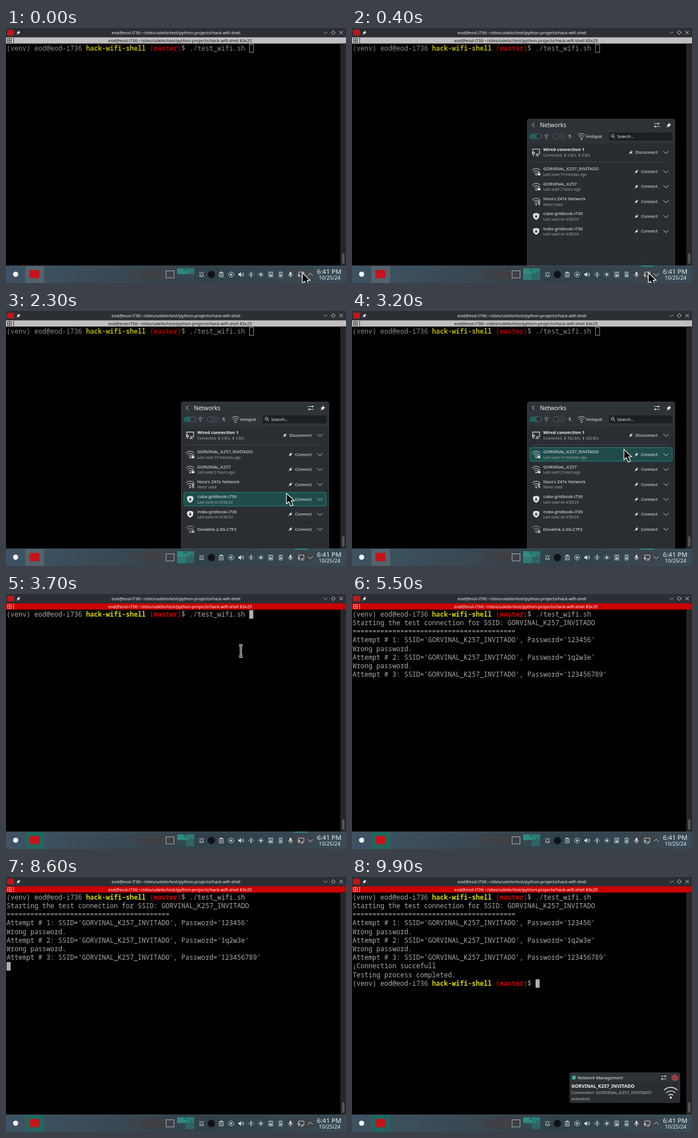
An HTML page for the animation above (10 s loop, 600 by 450 pixels).

```html
<!DOCTYPE html>
<html lang="en">
<head>
<meta charset="utf-8">
<title>Wi-Fi test</title>
<style>
html, body { margin: 0; width: 100%; height: 100%; overflow: hidden; background: #000; }
svg { display: block; width: 600px; height: 450px; }
text { font-family: "Noto Sans", sans-serif; font-size: 7.6px; fill: #f0f1f2; white-space: pre; }
.mono text { font-family: "Noto Sans Mono", monospace; font-size: 11.7px; fill: #aaa; }
.mono .dir { font-weight: bold; fill: #d8d400; }
.mono .git { font-weight: bold; fill: #cc0000; }
.sub { font-size: 6.4px; fill: #a5a9ac; }
.line { fill: none; stroke: #e6e8e9; stroke-width: .9; }
</style>
</head>
<body>
<svg id="stage" viewBox="0 0 600 450" xmlns="http://www.w3.org/2000/svg"></svg>
<script>
const LOOP = 10000;
const HOST = 'eod@eod-i736';
const PATH = HOST + ':~/sites/udelio/test/python-projects/hack-wifi-shell';
const WIFI = 'GORVINAL_K257';
const GUEST = WIFI + '_INVITADO';
const ROW = 15.2, COL = 7.02;

const rect = (x, y, w, h, fill, more = '') =>
  `<rect x="${x}" y="${y}" width="${w}" height="${h}" fill="${fill}" ${more}/>`;
const disc = (x, y, r, fill, more = '') =>
  `<circle cx="${x}" cy="${y}" r="${r}" fill="${fill}" ${more}/>`;
const line = (d, more = '') => `<path class="line" d="${d}" ${more}/>`;
const text = (x, y, s, more = '') => `<text x="${x}" y="${y}" ${more}>${s}</text>`;
const group = (id, body, more = '') => `<g id="${id}" ${more}>${body}</g>`;
const at = (x, y, body, k = 1) => `<g transform="translate(${x} ${y}) scale(${k})">${body}</g>`;

// Small icons, each drawn around 0,0
const icon = {
  wifi: line('M-7.4-2.4a10.5 10.5 0 0 1 14.8 0M-5 .6a7 7 0 0 1 10 0M-2.6 3.3a3.6 3.6 0 0 1 5.2 0') + disc(0, 5.8, 1.2, '#e6e8e9'),
  lock: rect(2.6, 3.2, 4.8, 3.6, '#e6e8e9') + line('M3.7 3.2v-1.2a1.3 1.3 0 0 1 2.6 0v1.2'),
  blue: line('M3 0l4 5l-2 2v-9l2 2l-4 5'),
  shield: '<path d="M0-6l5.4 1.8v3.6c0 3.6-2.7 5.6-5.4 7c-2.7-1.4-5.4-3.4-5.4-7v-3.6z" fill="#e6e8e9"/>' +
    rect(-1.9, -.6, 3.8, 3, '#3a3f44') + '<path d="M-1.2-.6v-1a1.2 1.2 0 0 1 2.4 0v1" fill="none" stroke="#3a3f44" stroke-width=".8"/>',
  wired: line('M-3.5 2.5h-1.5v-7h10v7h-5M1.5 2.5v2.5M-1 5h5M-5.5 0h3v2.5h-3zM-4 2.5v3'),
  plug: line('M-4.5 4.5l3-3M2 0l2.5-2.5M0-2l2.5-2.5') + '<path d="M-3 1l3.2-3.8l3 3l-3.8 3.2z" fill="#e6e8e9"/>',
  down: line('M-4.5-2l4.5 4.5l4.5-4.5'),
  up: line('M-4.5 2l4.5-4.5l4.5 4.5'),
  sliders: line('M-5-2.5h10M-5 2.5h10') + rect(2, -4, 1.5, 3, '#e6e8e9') + rect(-3.5, 1, 1.5, 3, '#e6e8e9'),
  pin: '<path d="M0-4l4 4l-1.4.4l-1.6 1.8l-.4 1.8l-1.6-1.6l-3.4 2.6l2.4-3.6l-1.6-1.6l1.8-.4l1.8-1.8z" fill="#f0f1f2"/>',
  bell: line('M-4 3h8l-1.5-2v-2a2.5 2.5 0 0 0-5 0v2zM-1 4.5h2M-4.5-3.5l1.5-1M4.5-3.5l-1.5-1'),
  clip: line('M-3.5-3.5h7v8h-7zM-2-.5h4M-2 2h4') + rect(-2, -5, 4, 2, '#e6e8e9'),
  play: line('M-4.6 0a4.6 4.6 0 1 0 9.2 0a4.6 4.6 0 1 0-9.2 0') + '<path d="M-1.5-2.5l4 2.5l-4 2.5z" fill="#e6e8e9"/>',
  sound: '<path d="M-5-1.5h2l3-3v9l-3-3h-2z" fill="#e6e8e9"/>' + line('M1.5-2a3 3 0 0 1 0 4M3-4a5.5 5.5 0 0 1 0 8'),
  tooth: line('M-2.5-2.5l5 5l-2.5 2.5v-10l2.5 2.5l-5 5') + disc(-4.5, 0, .8, '#e6e8e9') + disc(4.5, 0, .8, '#e6e8e9'),
  sun: disc(0, 0, 2, '#e6e8e9') + line('M0-5v2M0 3v2M-5 0h2M3 0h2M-3.5-3.5l1.2 1.2M2.3 2.3l1.2 1.2M-3.5 3.5l1.2-1.2M2.3-2.3l1.2-1.2'),
  disk: line('M-3.5-4.5h7v9h-7zM-1.8-2.5h3.6') + rect(-1.8, 0, 3.6, 3, '#e6e8e9'),
  drive: line('M-2.8-4.5h5.6v9h-5.6zM-1.2-2.8h2.4') + disc(0, 1.3, 1.5, '#e6e8e9'),
  mic: rect(-1.7, -5, 3.4, 6.5, '#e6e8e9', 'rx="1.7"') + line('M-3.5-1v1a3.5 3.5 0 0 0 7 0v-1M0 3.5v2')
};

const prompt = cmd =>
  `(venv) ${HOST} <tspan class="dir">hack-wifi-shell</tspan> <tspan class="git">(master)</tspan>$ ${cmd}`;
const attempt = (n, pass) => `Attempt # ${n}: SSID='${GUEST}', Password='${pass}'`;

// [time shown, text]
const output = [
  [0, prompt('./test_wifi.sh')],
  [4800, 'Starting the test connection for SSID: ' + GUEST],
  [4800, '='.repeat(41)],
  [4800, attempt(1, '123456')],
  [5000, 'Wrong password.'],
  [5000, attempt(2, '1q2w3e')],
  [5300, 'Wrong password.'],
  [5300, attempt(3, '123456789')],
  [8700, '¡Connection succefull'],
  [8700, 'Testing process completed.'],
  [8700, prompt('')]
];

// [name, second line, icon]
const networks = [
  [GUEST, 'Last used 19 minutes ago', icon.wifi + icon.lock],
  [WIFI, 'Last used 2 hours ago', icon.wifi + icon.lock],
  ["Nora's Z47e Network", 'Never used', icon.wifi + icon.blue],
  ['cuba-gridbook-i736', 'Last used on 6/30/24', icon.shield],
  ['india-gridbook-i736', 'Last used on 6/30/24', icon.shield],
  ['Dovalink-2.4G-C7F2', '', icon.wifi + icon.lock]
];
const rowY = i => 253 + 26.35 * i;

// [time, x, y] of the mouse pointer
const track = [
  [0, 523, 432], [1700, 523, 432], [1900, 505, 375], [2300, 495, 322],
  [2700, 480, 244.5], [3200, 480, 244.5], [3600, 414, 100.5]
];

function windowFrame() {
  return rect(0, 0, 600, 17, '#2b2f34') +
    rect(2, 3, 12, 10, '#c4141a', 'rx="1"') + at(22, 8, icon.pin, .85) +
    text(300, 11, PATH, 'text-anchor="middle" style="font-size:7.5px"') +
    at(564, 8, icon.down, .75) + line('M577.5 4.5l3.5 3.5l-3.5 3.5l-3.5-3.5zM588.5 5l6 6M594.5 5l-6 6') +
    rect(0, 16.5, 600, 11, '#c1bfc0', 'id="bar"') +
    group('grip', '<path d="M2.5 18.5h7v7h-7zM2.5 22h7M6 18.5v7M13.5 17v10" fill="none" stroke="currentColor" stroke-width=".9"/>') +
    text(307, 24.7, PATH + ' 83x25', 'id="caption" text-anchor="middle"') +
    rect(590, 27.5, 10, 392, '#262626') + rect(593, 397.5, 4.5, 18.5, '#555', 'rx="2"');
}

function terminal() {
  const rows = output.map(([, s], i) => text(1, 39.8 + ROW * i, s, `id="out${i}"`)).join('');
  return group('term', rows, 'class="mono"') + rect(1, 28.5, 7.2, 15, '#b0b0b0', 'id="caret"');
}

function networkRow([name, sub, pic], i) {
  const y = rowY(i);
  return group('net' + i,
    rect(314, y - 12, 251, 24, '#1f4c4b', `id="hot${i}" rx="2.5" stroke="#23877c"`) +
    `<g ${sub ? '' : 'opacity=".7"'}>${at(325, y, pic)}</g>` +
    text(337.5, sub ? y - 1.8 : y + 2.8, name) + text(337.5, y + 7.6, sub, 'class="sub"') +
    at(502, y, icon.plug, .8) + text(510, y + 2.8, 'Connect') + at(554, y, icon.down));
}

const toggle = (x, on) =>
  rect(x, 187, 21, 8, on ? '#1f625d' : '#34393e', `rx="4" stroke="${on ? '#237a71' : '#4d5257'}" stroke-width=".8"`) +
  disc(on ? x + 15.5 : x + 5, 191, 4.8, '#2c3136', 'stroke="#5f6469" stroke-width=".9"');

function panel() {
  return rect(309.5, 160.5, 260, 262, '#2a2e32', 'rx="2.5" stroke="#3a3f44"') +
    rect(310, 161, 259, 43, '#2e3338') +
    line('M322 167l-4 4l4 4') + text(331.5, 175, 'Networks', 'style="font-size:10.4px"') +
    at(538, 171, icon.sliders) + at(559, 171, icon.pin) +
    toggle(314, true) + at(343, 191, icon.wifi, .6) + toggle(355, false) +
    `<g opacity=".6">${at(384, 191, line('M-4-3l8 7M-3 3h6') + rect(-1, -4, 3, 5, '#e6e8e9'), .8)}</g>` +
    at(405, 191, icon.wifi, .9) + text(413, 193.8, 'Hotspot') +
    rect(452.5, 183.5, 114, 15.5, '#1d2023', 'rx="2" stroke="#34393d"') +
    line('M457.5 190a2.4 2.4 0 1 0 4.8 0a2.4 2.4 0 1 0-4.8 0M461.6 191.8l2.4 2.4') + text(468, 193.8, 'Search...') +
    at(325, 219, icon.wired, 1.2) + text(337.5, 217.2, 'Wired connection 1', 'font-weight="bold"') +
    text(337.5, 226.6, '', 'id="rate" class="sub"') +
    at(492, 219, icon.plug + line('M0 1.5l3.5 3.5M3.5 1.5l-3.5 3.5', 'style="stroke:#da4453"'), .8) +
    text(500, 221.8, 'Disconnect') + at(554, 219, icon.down) +
    line('M318 236h240', 'style="stroke:#43484c"') +
    networks.map(networkRow).join('');
}

function taskbar() {
  const tray = ['bell', '', 'clip', 'play', 'sound', 'tooth', 'sun', 'disk', 'drive', 'mic'];
  return rect(0, 419.5, 600, 30.5, 'url(#sky)') + rect(200, 419.5, 130, 30.5, 'url(#glow)') +
    rect(492, 419.5, 60, 30.5, 'url(#glow)') + rect(0, 419.5, 600, .8, '#4a5a64') +
    disc(17, 434.5, 4.5, '#fcfcfc') +
    rect(34, 420, 33.5, 30, '#55636c', 'id="task"') +
    rect(41.5, 427, 17.5, 14.5, '#c4141a', 'rx="1.5"') +
    rect(282.5, 428.5, 14, 12.5, 'none', 'stroke="#b5bfc4" stroke-width=".9"') +
    rect(302, 424, 15, 10.5, '#2f8a82') + rect(317, 424, 15, 10.5, '#2b7d77') +
    rect(302, 434.5, 15, 10.5, '#33474f', 'id="deskA"') + rect(317, 434.5, 15, 10.5, '#2f6465', 'id="deskB"') +
    rect(313, 424.5, 5, 4, '#236c68') + rect(325, 430, 5, 3.5, '#236c68') +
    tray.map((k, i) => k ? at(345 + 17.45 * i, 435, icon[k], .95) : disc(362.5, 435, 6.5, '#111116')).join('') +
    at(521, 435, icon.wired, .95) +
    rect(509.5, 419.5, 22.5, 1.6, '#1fa08f', 'id="mark"') +
    group('spin', '<path d="M0-5.8a5.8 5.8 0 0 1 5.8 5.8" fill="none" stroke="#27b09d" stroke-width="1.3"/>') +
    group('arrowUp', at(537, 435, icon.up)) + group('arrowDown', at(537, 435, icon.down)) +
    text(570.3, 434.3, '6:41 PM', 'text-anchor="middle" style="font-size:11.5px"') +
    text(571, 444.3, '10/25/24', 'text-anchor="middle" style="font-size:9.1px"');
}

function notice() {
  return rect(384.5, 345.5, 194, 52.5, '#2a2e32', 'rx="2.5" stroke="#3a3f44"') + rect(385, 346, 193, 15.5, '#2e3338') +
    disc(391.5, 354, 3.8, '#3fa796') + text(398, 356.8, 'Network Management') +
    at(550, 354, icon.sliders, .95) +
    disc(570, 354, 4.6, '#c23a43') + line('M568 352l4 4M572 352l-4 4', 'style="stroke:#2a2e32"') +
    '<path id="ring" fill="none" stroke="#8a5055" stroke-width="1.1"/>' +
    text(387, 372, GUEST, 'font-weight="bold" style="font-size:8.3px"') +
    text(387, 382.8, `Connection '${GUEST}'`, 'style="font-size:7.5px;fill:#b9bcbe"') +
    text(387, 393.6, 'activated.', 'style="font-size:7.5px;fill:#b9bcbe"') +
    at(562.5, 380, icon.wifi, 1.6);
}

const arrow = '<path d="M0 0v18.5l4.2-3.8l3.5 7.8l4-1.8l-3.5-7.6h5.6z" fill="#000" stroke="#fff" stroke-width="1.2"/>';
const beamPath = 'M-3-10h2l1 1l1-1h2M0-9v18M-3 10h2l1-1l1 1h2';
const beam = `<path d="${beamPath}" fill="none" stroke="#fff" stroke-width="3.4"/>` +
  `<path d="${beamPath}" fill="none" stroke="#000" stroke-width="1.2"/>`;

const stage = document.getElementById('stage');
stage.innerHTML = `<defs>
  <linearGradient id="sky"><stop offset="0" stop-color="#3d5363"/><stop offset=".35" stop-color="#384853"/>
    <stop offset=".6" stop-color="#31414a"/><stop offset="1" stop-color="#394b56"/></linearGradient>
  <radialGradient id="glow"><stop offset="0" stop-color="#483c3c" stop-opacity=".75"/>
    <stop offset="1" stop-color="#483c3c" stop-opacity="0"/></radialGradient></defs>` +
  rect(0, 0, 600, 450, '#000') + terminal() + windowFrame() +
  group('panel', panel()) + group('notice', notice()) + taskbar() +
  group('arrow', arrow) + group('beam', beam);

const el = {};
stage.querySelectorAll('[id]').forEach(e => el[e.id] = e);
const show = (id, on) => el[id].style.display = on ? '' : 'none';
const set = (id, attrs) => { for (const k in attrs) el[id].setAttribute(k, attrs[k]); };
const clamp = v => Math.max(0, Math.min(1, v));
const ease = v => 1 - (1 - clamp(v)) ** 3;

function pointer(t) {
  const i = track.findIndex(k => k[0] > t);
  if (i < 0) return track[track.length - 1].slice(1);
  const [a, b] = [track[i - 1], track[i]];
  const p = (t - a[0]) / (b[0] - a[0]);
  return [a[1] + (b[1] - a[1]) * p, a[2] + (b[2] - a[2]) * p];
}

function render(t) {
  const focus = t >= 3600;
  const open = t >= 200 && !focus;

  // Terminal
  output.forEach(([from], i) => show('out' + i, t >= from));
  set('term', { opacity: focus ? 1 : .82 });
  set('bar', { fill: focus ? '#cc0000' : '#c1bfc0' });
  el.caption.style.fill = focus ? '#fff' : '#151515';
  el.grip.style.color = focus ? '#e8b5b5' : '#333';
  const count = output.filter(o => t >= o[0]).length;
  const row = count === 1 ? 0 : count < output.length ? count : count - 1;
  const col = count === 1 ? 61 : count < output.length ? 0 : 46;
  const solid = Math.floor((t - 100) / 600) % 2 === 0;
  show('caret', !focus || solid);
  const inset = focus ? 0 : .5;
  set('caret', {
    x: 1 + COL * col + inset, y: 28.5 + ROW * row + inset, height: 15 - 2 * inset,
    fill: focus ? '#b0b0b0' : 'none', stroke: focus ? 'none' : '#999'
  });

  // Popup
  const [x, y] = pointer(t);
  const rise = ease((t - 200) / 250);
  show('panel', open);
  set('panel', { opacity: rise, transform: `translate(0 ${(1 - rise) * 30})` });
  el.rate.textContent = t < 2600 ? 'Connected, ⬇ 0 B/s, ⬆ 0 B/s' : 'Connected, ⬇ 392 B/s, ⬆ 320 B/s';
  show('net5', t >= 2200);
  networks.forEach((_, i) => show('hot' + i, Math.abs(y - rowY(i)) < 13.1 && t > 1700 && (i < 5 || t >= 2200)));

  // Taskbar
  const marked = t >= 200 && t < 3900;
  show('mark', marked);
  show('arrowDown', marked);
  show('arrowUp', !marked);
  set('task', { fill: focus ? '#20665f' : '#55636c' });
  set('deskA', { fill: open ? '#2f7a76' : '#33474f' });
  set('deskB', { fill: t < 200 ? '#36464d' : '#2f6465' });
  show('spin', t >= 4900 && t < 8700);
  set('spin', { transform: `translate(521 435) rotate(${t * .36 % 360})` });

  // Notification with its countdown ring
  const slide = ease((t - 8750) / 250);
  show('notice', t >= 8750);
  set('notice', { opacity: slide, transform: `translate(0 ${(1 - slide) * 12})` });
  const a = clamp((t - 8750) / 5000) * 2 * Math.PI;
  set('ring', { d: `M${570 + 5.8 * Math.sin(a)} ${354 - 5.8 * Math.cos(a)}A5.8 5.8 0 ${a < Math.PI ? 1 : 0} 1 569.9 348.2` });

  // Pointer
  const overTerm = focus || y < 160;
  show('arrow', !overTerm);
  show('beam', overTerm && t < 4600);
  set('arrow', { transform: `translate(${x} ${y})` });
  set('beam', { transform: `translate(${x + .5} ${y})` });
}

const start = performance.now();
function tick() {
  render((performance.now() - start) % LOOP);
  requestAnimationFrame(tick);
}
tick();
</script>
</body>
</html>
```
